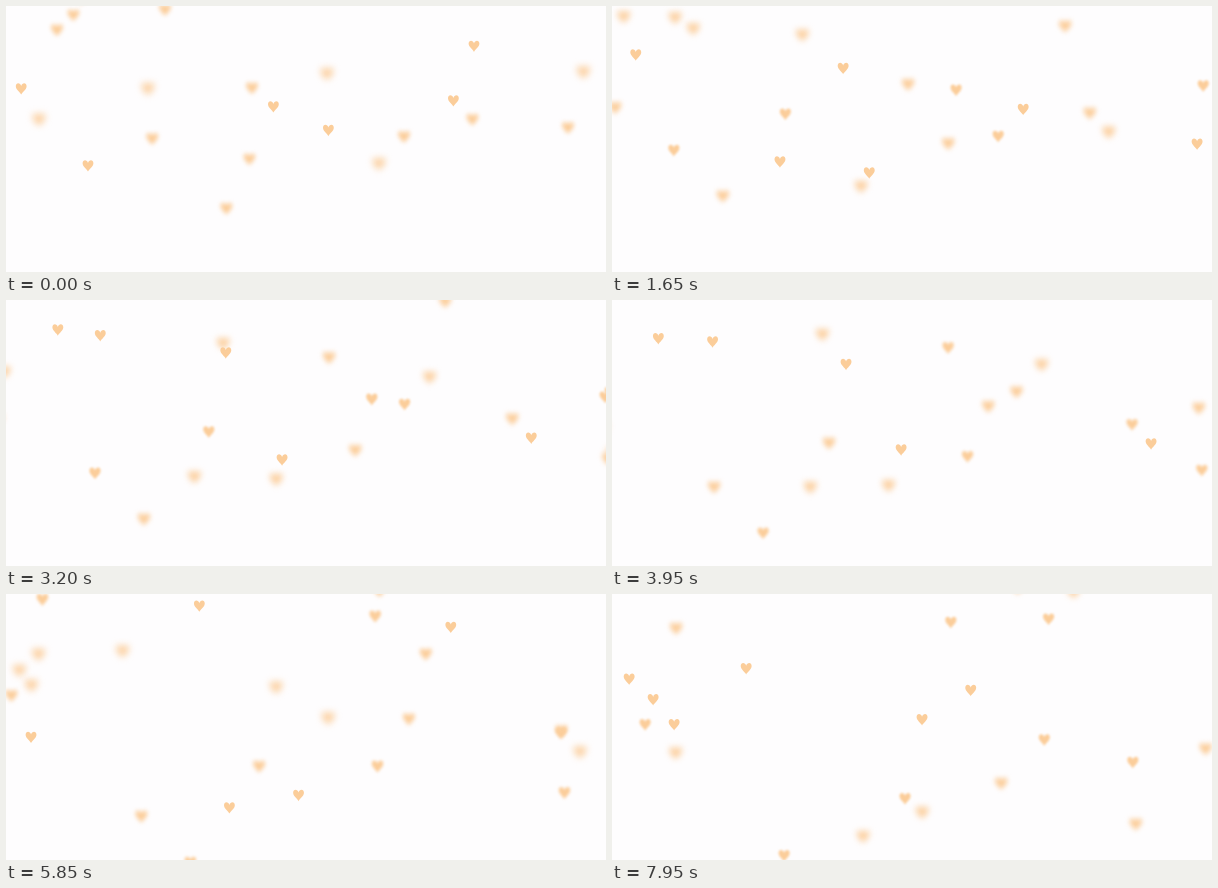
Write an HTML page with a canvas that moves like this. It is 600 by 266 pixels and loops after 8000 ms.

```html
<!DOCTYPE html>
<html lang="en">
<head>
<meta charset="utf-8">
<title>Drifting hearts</title>
<style>
  html, body { margin: 0; width: 100%; height: 100%; overflow: hidden; background: #fefdfe; }
  canvas { display: block; }
</style>
</head>
<body>
<canvas id="stage" width="600" height="266"></canvas>
<script>
const LOOP = 8000, STEP = 50, MIDDLE = 4;
const FOCUS_PERIOD = 4.8, MIN_BLUR = 0.5, MAX_BLUR = 3.6, GROWTH = 0.15;
const ctx = document.getElementById('stage').getContext('2d');
const heart = new Path2D('M0 6C-1 3.6-5.4 1-5.4-2.4C-5.4-6.3-.9-6.3 0-2.6C.9-6.3 5.4-6.3 5.4-2.4C5.4 1 1 3.6 0 6Z');

// Each stream shares one drift (pixels per second);
// its points are where the hearts pass in the middle of the loop.
const streams = [
  { drift: [17.5, 18.6], points: [[103, 188], [-7, 57], [152, 234]] },
  { drift: [13.2, 13.8], points: [[199, 188], [-19, 76], [-11, 51], [12, -20]] },
  { drift: [8, -16.7], points: [[430, 64], [405, 91]] },
  { drift: [-7.3, 11.6], points: [[46, 39], [-14, 129]] },
  { drift: [8.4, 8.2], points: [[277, 186], [611, 99], [101, 42], [356, 157]] },
  { drift: [14, 9.8], points: [[618, 161], [377, 107]] },
  { drift: [18.4, 7.6], points: [[540, 144], [521, 125], [-9, 129]] },
  { drift: [19, 15.3], points: [[218, 144], [235, 65]] },
  { drift: [-9, -12], points: [[432, -8], [210, 34]] },
  { drift: [-16.5, 15], points: [[586, 109], [-27, 46], [589, 171], [-15, 84], [404, -31]] },
  { drift: [17.4, -13.4], points: [[290, 149], [337, 47]] }
];
const hearts = streams.flatMap(({ drift, points }) => points.map(point => ({ drift, point })));

// Successive hearts go out of focus a quarter of a period apart.
function softness(seconds, index) {
  return (1 + Math.cos(2 * Math.PI * (seconds / FOCUS_PERIOD - index / 4))) / 2;
}

function drawHeart({ drift: [vx, vy], point: [x, y] }, index, seconds) {
  const soft = softness(seconds, index);
  const scale = 1 + GROWTH * soft;
  const offset = seconds - MIDDLE;
  ctx.filter = `blur(${(MIN_BLUR + (MAX_BLUR - MIN_BLUR) * soft).toFixed(2)}px)`;
  ctx.setTransform(scale, 0, 0, scale, x + vx * offset, y + vy * offset);
  ctx.fill(heart);
}

function draw(seconds) {
  ctx.resetTransform();
  ctx.filter = 'none';
  ctx.fillStyle = '#fefdfe';
  ctx.fillRect(0, 0, 600, 266);
  ctx.fillStyle = '#fbcd9a';
  hearts.forEach((item, index) => drawHeart(item, index, seconds));
}

const start = performance.now();
function tick() {
  const elapsed = (performance.now() - start) % LOOP;
  draw(Math.floor(elapsed / STEP) * STEP / 1000);
  requestAnimationFrame(tick);
}
tick();
</script>
</body>
</html>
```
